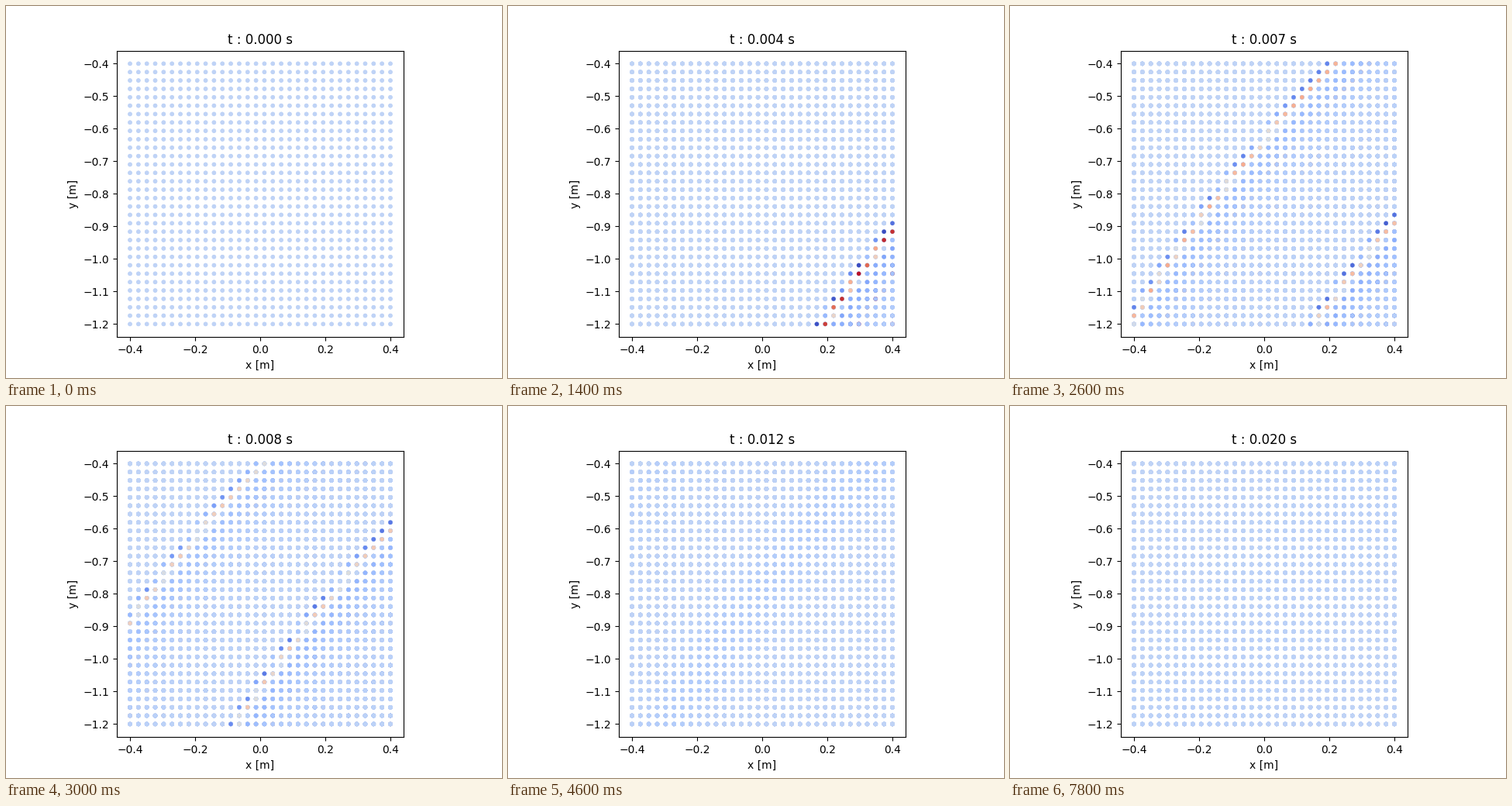
A matplotlib script for the animation above (8 s loop, 640 px wide and 480 px high).

```python
import numpy as np
import matplotlib.pyplot as plt
from matplotlib.animation import FuncAnimation

FRAMES = 40
INTERVAL = 200
DURATION = 0.02
TRAIL = 20          # stacked scatters kept on screen
REST = 0.395        # colormap position of zero pressure
DOT = 15.6

gx, gy = np.meshgrid(np.linspace(-0.4, 0.4, 32), np.linspace(-1.2, -0.4, 32))
gx, gy = gx.ravel(), gy.ravel()
SOURCE = np.array([3.2333, -3.3452])


def gauss(u, mid, width):
    return np.exp(-0.5 * ((u - mid) / width) ** 2)


def behind(radius, shift=(0, 0)):
    """Distance in mm from each point to a circular front, positive behind it."""
    cx, cy = SOURCE + shift
    return 1000 * (radius - np.hypot(gx - cx, gy - cy))


def pulse(u, high, low):
    """Thin dip, sharp peak and a decaying negative tail."""
    high, low = max(high, 0), max(low, 0)
    back = np.maximum(u - 10, 0)
    tail = 0.55 * np.exp(-back / 45) + 0.13 * np.exp(-back / 170)
    tail *= 1 - np.exp(-(back / 14) ** 2)
    return high * gauss(u, 1.2, 6.2) - low * (gauss(u, -15.5, 4.8) + tail)


def field(k):
    k = min(k, 33)
    a, b = k - 11, k - 15
    first = behind(4.0631 + 0.0833 * a - 0.00036 * a * a,
                   np.array([-0.0161, -0.0238]) * a)
    second = behind(3.9429 + 0.0938 * b - 0.00067 * b * b)
    p = pulse(first, 0.6 - 0.049 * (k - 7), 0.42 - 0.024 * (k - 7))
    p += pulse(second, 0.22 - 0.022 * b, 0.3 - 0.03 * b)
    # faint late echoes
    p -= 0.04 * gauss(behind(3.555 + 0.088 * (k - 16.5)), 0, 60)
    late = max(0.03 - 0.0045 * abs(k - 29), 0)
    p -= late * gauss(behind(3.738 + 0.088 * (k - 29)), 0, 140)
    return np.clip(REST + p, 0, 1)


fig, ax = plt.subplots(figsize=(6.4, 4.8), dpi=100)
ax.set_aspect("equal")
ax.set_xlabel("x [m]")
ax.set_ylabel("y [m]")
ax.set_xlim(-0.44, 0.44)
ax.set_ylim(-1.24, -0.36)
title = ax.set_title("t : 0.000 s")

# Every step paints over the earlier ones, so dot edges harden with time.
layers = [
    ax.scatter(gx, gy, c=field(max(i - 1, 0)), s=DOT, cmap="coolwarm",
               vmin=0, vmax=1, edgecolors="none")
    for i in range(FRAMES + 1)
]


def update(k):
    for i, layer in enumerate(layers):
        layer.set_visible(k + 1 - TRAIL < i <= k + 1)
    title.set_text(f"t : {k * DURATION / (FRAMES - 1):.3f} s")
    return [*layers, title]


anim = FuncAnimation(fig, update, frames=FRAMES, interval=INTERVAL,
                     repeat=True, repeat_delay=0, blit=False)
plt.show()
```
